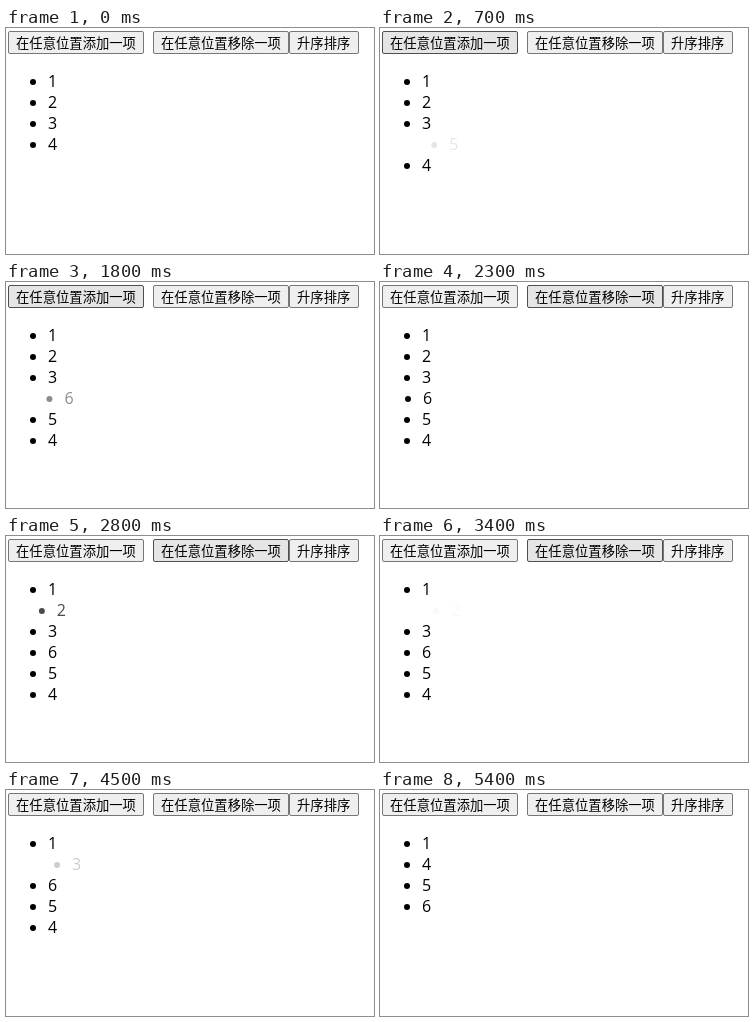
An HTML page for the animation above (6.8 s loop, 368 px wide and 226 px high).

```html
<!DOCTYPE html>
<html lang="zh-CN">
<head>
<meta charset="utf-8">
<title>列表过渡</title>
<style>
  html, body { margin: 0; width: 100%; height: 100%; overflow: hidden; background: #fff; color: #000; }
  .btn {
    position: absolute; top: 3px; height: 23px; box-sizing: border-box;
    border: 1px solid #767676; border-radius: 2px; background: #efefef;
    font: 13.333px/21px "Noto Sans CJK SC", "Noto Sans CJK", sans-serif;
    padding-left: 7px; white-space: nowrap;
  }
  .btn.hover { background: #e5e5e5; border-color: #4f4f4f; }
  .btn.active { background: #f5f5f5; border-color: #8d8d8d; }
  ul { margin: 0; padding: 0; list-style: none; }
  li {
    position: absolute; left: 42px; top: 43px; height: 21px;
    font: 16px/21px "Open Sans", "Noto Sans", sans-serif;
  }
  li::before {
    content: ""; position: absolute; left: -18px; top: 8px;
    width: 6px; height: 6px; border-radius: 50%; background: #000;
  }
</style>
</head>
<body>
<div class="btn" style="left:2px;width:136px">在任意位置添加一项</div>
<div class="btn" style="left:147px;width:136px">在任意位置移除一项</div>
<div class="btn" style="left:283px;width:70px">升序排序</div>
<ul></ul>
<script>
const LOOP = 6800, TICK = 100, FADE = 1000, SHIFT = 30, ROW = 21;

// [start time, state] per button
const pointer = [
  [[0, ''], [300, 'hover'], [600, 'active'], [700, 'hover'], [1500, 'active'], [1600, 'hover'], [2000, '']],
  [[0, ''], [2200, 'hover'], [2600, 'active'], [2700, 'hover'], [3900, 'active'], [4100, 'hover'], [4400, '']],
  [[0, ''], [4800, 'hover'], [5100, 'active'], [5200, 'hover'], [5400, '']]
];
// [start time, visible order]
const orders = [
  [0, '1234'], [601, '12354'], [1530, '123654'],
  [3600, '13654'], [5000, '1654'], [5200, '1456']
];
const enter = { 5: 600, 6: 1530 };
const leave = { 2: 2600, 3: 4000 };

const buttons = [...document.querySelectorAll('.btn')];
const list = document.querySelector('ul');
const items = [1, 2, 3, 4, 5, 6].map(n => {
  const li = document.createElement('li');
  li.textContent = n;
  return list.appendChild(li);
});

const at = (track, t) => track.filter(k => k[0] <= t).pop()[1];
const bezier = (a, b, s) => 3 * a * s * (1 - s) ** 2 + 3 * b * s * s * (1 - s) + s ** 3;

// CSS "ease": cubic-bezier(.25, .1, .25, 1)
function ease(x) {
  if (x <= 0) return 0;
  if (x >= 1) return 1;
  let lo = 0, hi = 1;
  for (let i = 0; i < 30; i++) {
    const mid = (lo + hi) / 2;
    if (bezier(.25, .25, mid) < x) lo = mid; else hi = mid;
  }
  return bezier(.1, 1, lo);
}

function away(n, t) {
  if (n in enter) return 1 - ease((t - enter[n]) / FADE);
  if (n in leave) return ease((t - leave[n]) / FADE);
  return 0;
}

function draw(t) {
  buttons.forEach((b, i) => { b.className = 'btn ' + at(pointer[i], t); });
  const order = at(orders, t);
  items.forEach((li, i) => {
    const row = order.indexOf(i + 1), k = away(i + 1, t);
    li.style.display = row < 0 ? 'none' : 'block';
    li.style.opacity = 1 - k;
    li.style.transform = `translate(${k * SHIFT}px, ${row * ROW}px)`;
  });
}

const begin = performance.now();
function frame() {
  const t = (performance.now() - begin) % LOOP;
  draw(Math.floor(t / TICK) * TICK);
  requestAnimationFrame(frame);
}
frame();
</script>
</body>
</html>
```
